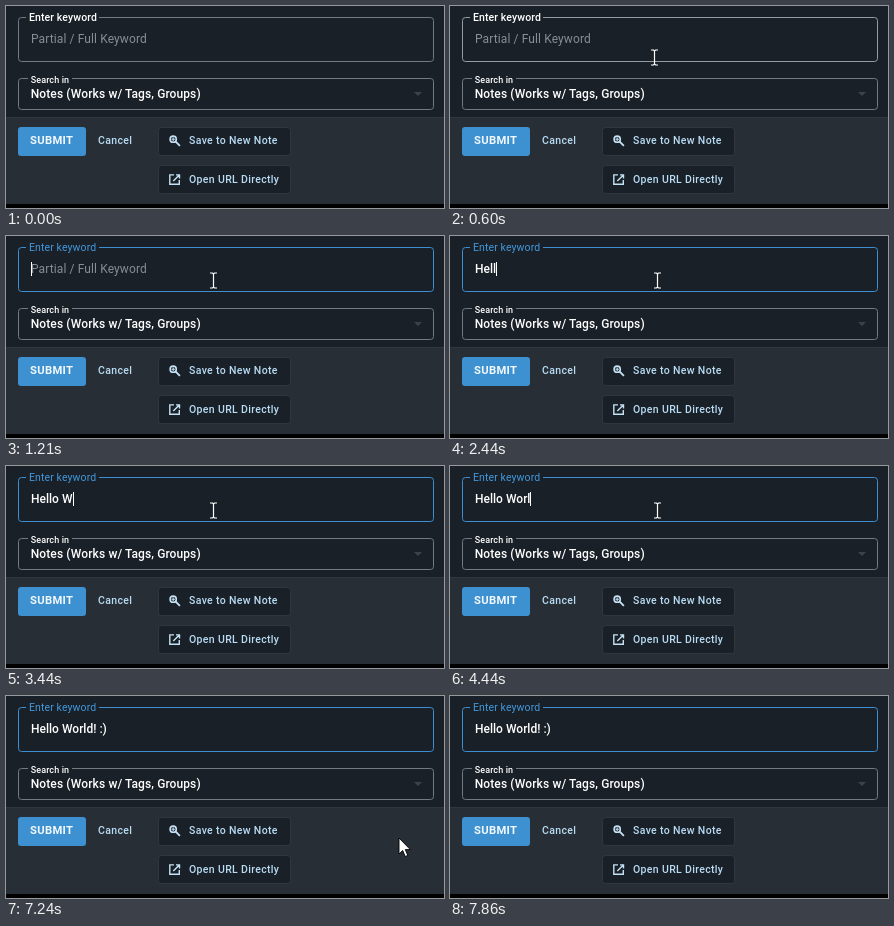
Write an HTML page that moves like this. It is 438x202 px and loops after 8060 ms.

```html
<!DOCTYPE html>
<html lang="en">
<head>
<meta charset="utf-8">
<title>Keyword form</title>
<style>
  html, body { margin: 0; width: 100%; height: 100%; overflow: hidden; background: #000; }
  svg { display: block; width: 438px; height: 202px; }
  text { font: 500 12px Roboto, sans-serif; white-space: pre; fill: #fff; letter-spacing: .11px; }
  .field { fill: none; stroke: #747a80; }
  .label { font-size: 10.5px; }
  .small { font-size: 9px; }
  #placeholder { font-weight: 400; fill: #888e93; }
  #typed { letter-spacing: 0; }
  .hover .field { stroke: #959da3; }
  .focus .field { stroke: #3d8fd1; }
  .focus .label { font-weight: 400; fill: #4298dc; }
  .button { fill: #1a2027; stroke: #30383f; }
  .action { font-size: 10.5px; letter-spacing: .34px; fill: #b9dcf5; }
  .submit { font-weight: 700; font-size: 11.25px; letter-spacing: .3px; fill: #f2f8fd; }
  .icon { fill: none; stroke: #c5e1f5; stroke-width: 1.4; }
</style>
</head>
<body>
<svg viewBox="0 0 438 202">
  <rect width="438" height="112" fill="#1a2027"/>
  <rect y="111" width="438" height="87" fill="#272e35"/>
  <path d="M0 111.5H438" stroke="#30373e"/>

  <g id="keyword">
    <path class="field" d="M20 11.5H15.5a3 3 0 0 0-3 3V52.5a3 3 0 0 0 3 3H424.5a3 3 0 0 0 3-3V14.5a3 3 0 0 0-3-3H93"/>
    <text class="label" x="23" y="15">Enter keyword</text>
  </g>
  <text id="placeholder" x="25" y="37">Partial / Full Keyword</text>
  <text id="typed" x="25" y="37"></text>
  <rect id="caret" y="26" width="1" height="14" fill="#fff"/>

  <path class="field" d="M22 72.5H15.5a3 3 0 0 0-3 3V100.5a3 3 0 0 0 3 3H424.5a3 3 0 0 0 3-3V75.5a3 3 0 0 0-3-3H66"/>
  <text class="small" x="24.7" y="76.5">Search in</text>
  <text x="24.7" y="92">Notes (Works w/ Tags, Groups)</text>
  <path d="M408 86h8l-4 4z" fill="#3b4248"/>

  <rect x="12" y="121" width="68" height="29" rx="3" fill="#3d91d0"/>
  <text class="submit" x="24" y="138">SUBMIT</text>
  <text class="action" x="92" y="138">Cancel</text>
  <rect class="button" x="152.5" y="121.5" width="132" height="28" rx="3"/>
  <text class="action" x="183" y="138">Save to New Note</text>
  <rect class="button" x="152.5" y="159.5" width="132" height="28" rx="3"/>
  <text class="action" x="183" y="177">Open URL Directly</text>
  <g class="icon">
    <circle cx="167.2" cy="133.2" r="3.1" stroke-width="1.6"/>
    <path d="M169.7 135.7l4.2 4.2" stroke-width="1.9"/>
    <path d="M165.5 133.2h3.4M167.2 131.5v3.4" stroke-width="1.1"/>
    <path d="M168 168.9H163.8V178.3H173.3V174M170 168.9h3.5v3.5M173.3 169l-6 6"/>
  </g>

  <path id="ibeam" d="M-3.5-7.5h2.5l1 1 1-1h2.5M0-6.5v13M-3.5 7.5h2.5l1-1 1 1h2.5" fill="none" stroke="#fff" stroke-width="1.2"/>
  <path id="arrow" d="M0 0V16L3.7 12.5 6.2 18.5 8.8 17.4 6.3 11.6H11.3z" fill="#fff" stroke="#000" stroke-width=".9"/>
</svg>
<script>
const LOOP = 8060, HOVER = 600, FOCUS = 1210;
const MESSAGE = 'Hello World! :)';
const $ = id => document.getElementById(id);

// [time, characters typed]
const typing = [[0, 0], [2220, 2], [2440, 4], [2840, 5], [3240, 6], [3440, 7], [4240, 8],
  [4440, 10], [4640, 11], [5040, 12], [5440, 13], [5840, 14], [6240, 15]];
// [time, caret visible]
const blinking = [[0, 0], [FOCUS, 1], [1820, 0], [2220, 1], [4040, 0], [4240, 1],
  [6840, 0], [7440, 1], [7860, 0]];
// [time, pointer shape, x, y]
const pointer = [[0], [400, 'arrow', 201, 106], [HOVER, 'ibeam', 204.5, 51.5],
  [800, 'ibeam', 205.5, 47.5], [1000, 'ibeam', 207.5, 44.5], [5640, 'arrow', 330, 87],
  [5840, 'arrow', 366.5, 108], [7240, 'arrow', 393, 142], [7440, 'arrow', 419, 185], [7640]];

const stateAt = (steps, time) => steps.findLast(step => step[0] <= time);

function draw(now) {
  const time = now % LOOP;
  const count = stateAt(typing, time)[1];
  const [, shape, x, y] = stateAt(pointer, time);
  const typed = $('typed');

  $('keyword').setAttribute('class', time >= FOCUS ? 'focus' : time >= HOVER ? 'hover' : '');
  $('placeholder').style.display = count ? 'none' : '';
  typed.textContent = MESSAGE.slice(0, count);
  const width = count ? typed.getComputedTextLength() : 0;
  $('caret').setAttribute('x', 25 + Math.round(width));
  $('caret').style.display = stateAt(blinking, time)[1] ? '' : 'none';

  for (const id of ['ibeam', 'arrow']) {
    $(id).style.display = id === shape ? '' : 'none';
    if (id === shape) $(id).setAttribute('transform', `translate(${x} ${y})`);
  }
}

const start = performance.now();
function tick() {
  draw(performance.now() - start);
  requestAnimationFrame(tick);
}
tick();
</script>
</body>
</html>
```
